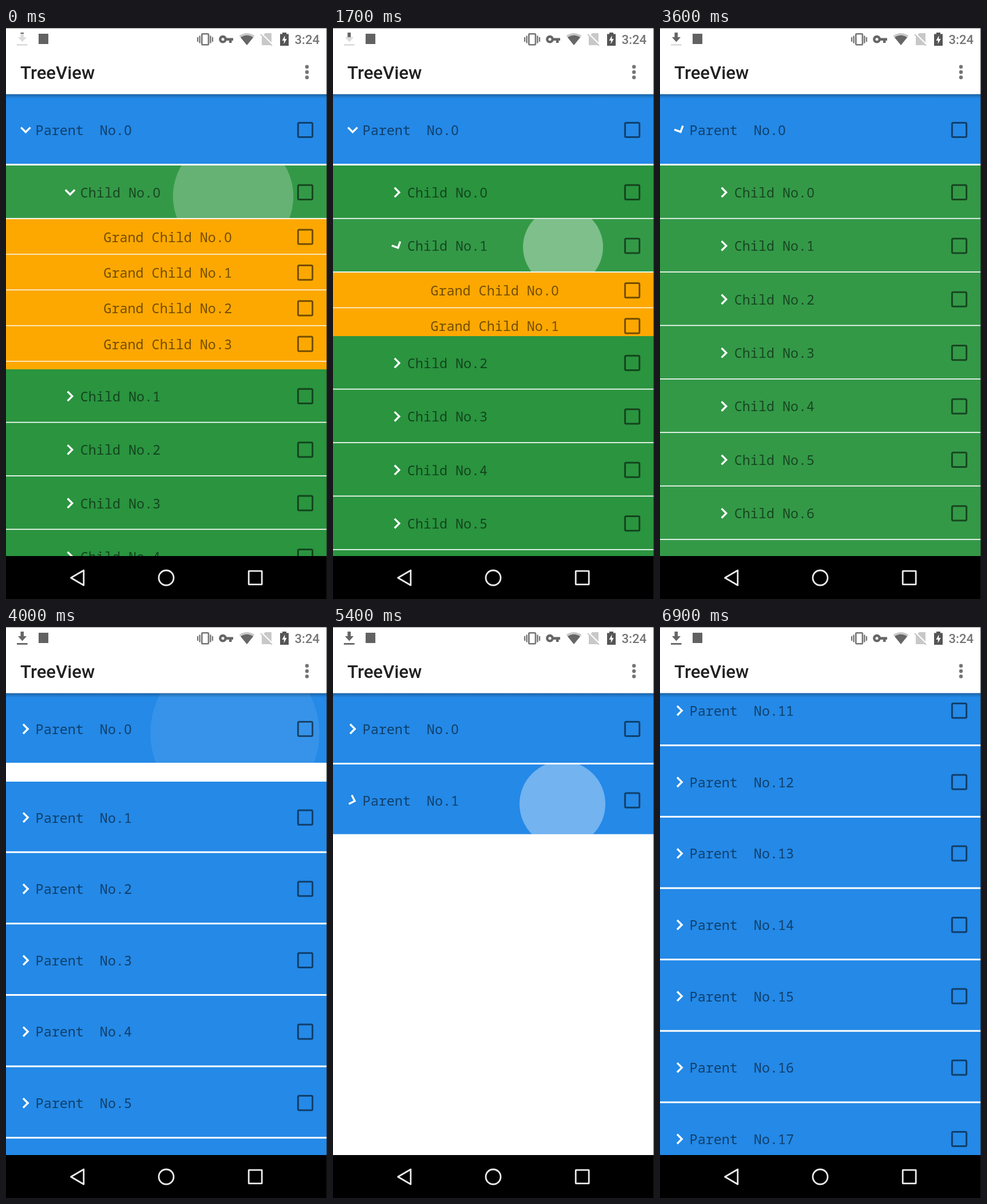
Write an HTML page with a canvas that moves like this. It is 561x997 px and loops after 7000 ms.

```html
<!DOCTYPE html>
<html lang="en">
<head>
<meta charset="utf-8">
<title>TreeView</title>
<style>
  html, body { margin: 0; width: 100%; height: 100%; overflow: hidden; background: #fff; }
  canvas { display: block; }
</style>
</head>
<body>
<canvas id="stage" width="561" height="997"></canvas>
<script>
const ctx = document.getElementById('stage').getContext('2d');
const W = 561, LOOP = 7000, LIST_TOP = 115.4, LIST_END = 922;
const INK = 'rgba(0,0,0,.54)', GRAY = '#757575';

const levels = [
  { color: '#2489e7', pitch: 124.65, line: 3, count: 20, label: 'Parent  No.', textX: 51.6, arrowX: 34.4, mid: 62.6 },
  { color: '#2a943f', pitch: 93.4, line: 1.7, count: 30, label: 'Child No.', textX: 129.8, arrowX: 112, mid: 46.9 },
  { color: '#fca800', pitch: 62.3, line: 1.4, count: 5, label: 'Grand Child No.', textX: 170.4, mid: 31.3 }
];

// x and y give the touch point inside the row
const taps = [
  { id: '0.0', at: -222, open: true, x: 397, y: 54 },
  { id: '0.0', at: 800, open: false, x: 400, y: 52 },
  { id: '0.1', at: 1578, open: true, x: 402, y: 49 },
  { id: '0.1', at: 2560, open: false, x: 401, y: 50 },
  { id: '0', at: 3533, open: false, x: 400, y: 70 },
  { id: '1', at: 4590, open: true, x: 400, y: 69 },
  { id: '1', at: 5266, open: false, x: 401, y: 69 }
];

const ease = u => (1 - Math.cos(Math.PI * Math.min(1, Math.max(0, u)))) / 2;

function nodeState(id, t) {
  const state = { height: id === '0' ? 1 : 0, turn: id === '0' ? 1 : 0, blank: false, tap: null };
  for (const tap of taps) {
    const age = t - tap.at;
    if (tap.id !== id || age < -60) continue;
    state.tap = tap;
    if (age < 0) continue;
    const duration = id.includes('.') ? 300 : 500;
    const grown = ease(age / duration), turned = ease(age / 190);
    state.height = tap.open ? grown : 1 - grown;
    state.turn = tap.open ? turned : 1 - turned;
    state.blank = !tap.open && duration === 500 && age > 100;
  }
  return state;
}

function fill(color, x, y, w, h) {
  ctx.fillStyle = color;
  ctx.fillRect(x, y, w, h);
}

function path(points, close) {
  ctx.beginPath();
  points.forEach(([x, y]) => ctx.lineTo(x, y));
  if (close) ctx.closePath();
}

function polygon(color, ...points) {
  path(points, true);
  ctx.fillStyle = color;
  ctx.fill();
}

function stroke(color, width, ...points) {
  path(points, false);
  ctx.strokeStyle = color;
  ctx.lineWidth = width;
  ctx.stroke();
}

function circle(x, y, r) {
  ctx.beginPath();
  ctx.arc(x, y, r, 0, 7);
}

function dot(color, x, y, r) {
  circle(x, y, r);
  ctx.fillStyle = color;
  ctx.fill();
}

function box(color, width, x, y, w, h, r) {
  ctx.beginPath();
  ctx.roundRect(x, y, w, h, r);
  ctx.strokeStyle = color;
  ctx.lineWidth = width;
  ctx.stroke();
}

function text(str, x, y, font, color) {
  ctx.font = font;
  ctx.fillStyle = color;
  ctx.fillText(str, x, y);
}

// The zero is set in the proportional face, which has no slash
function label(str, x, y) {
  const mono = '23.4px "Noto Sans Mono", monospace';
  text(str.replace('0', ' '), x, y, mono, INK);
  const zero = str.indexOf('0');
  if (zero >= 0) text('0', x + zero * 14.04 + .3, y, '23.4px "Noto Sans", sans-serif', INK);
}

function chevron(x, y, turn) {
  ctx.save();
  ctx.translate(x, y);
  ctx.rotate(turn * Math.PI / 2);
  stroke('#fff', 3.4, [-4.4, -8.2], [3.8, 0], [-4.4, 8.2]);
  ctx.restore();
}

function ripple(tap, y, height, age) {
  if (age < 80 || age > 660) return;
  const r = 170 * (1 - Math.exp(-age / 230));
  const alpha = Math.min(.37, .37 - (r - 72) * .0038);
  ctx.save();
  ctx.beginPath();
  ctx.rect(0, y, W, height);
  ctx.clip();
  dot(`rgba(255,255,255,${alpha})`, tap.x, y + tap.y, r);
  ctx.restore();
}

function drawRow(depth, index, y, state, lit, t) {
  const level = levels[depth], height = level.pitch - level.line, mid = y + level.mid;
  fill(level.color, 0, y, W, height);
  const age = state.tap ? t - state.tap.at : Infinity;
  if (depth === 1 && (lit || age < 480)) fill('rgba(255,255,255,.042)', 0, y, W, height);
  if (state.tap) ripple(state.tap, y, height, age);
  if (depth < 2) chevron(level.arrowX, mid, state.turn);
  label(level.label + index, level.textX, mid + 8.9);
  box(INK, 3, 510.4, mid - 12.6, 25.2, 25.2, 2);
}

function drawList(depth, y, prefix, lit, t) {
  const level = levels[depth], inner = levels[depth + 1];
  for (let i = 0; i < level.count && y < LIST_END; i++) {
    const id = prefix + i, state = nodeState(id, t);
    drawRow(depth, i, y, state, lit, t);
    y += level.pitch;
    if (!inner || !state.height) continue;
    const end = Math.round(y + state.height * inner.pitch * inner.count);
    if (!state.blank) {
      ctx.save();
      ctx.beginPath();
      ctx.rect(0, y, W, end - y);
      ctx.clip();
      drawList(depth + 1, y, id + '.', depth === 0 && state.tap && t - state.tap.at < 480, t);
      ctx.restore();
    }
    y = end;
  }
}

function downloadIcon(t) {
  const step = Math.floor(((t - 1150 + LOOP + 500) % 1500) / 250);
  const shape = color => {
    fill(color, 25.5, 8, 5.5, 9);
    polygon(color, [21, 16], [36, 16], [28.5, 24.5]);
    fill(color, 19, 28, 18.5, 2.8);
  };
  shape('#dcdcdc');
  ctx.save();
  ctx.beginPath();
  ctx.rect(15, 8, 26, [0, 2, 8, 17, 17, 24][step]);
  ctx.clip();
  shape('#666');
  ctx.restore();
}

function statusBar(t) {
  downloadIcon(t);
  fill('#626262', 57, 10, 17, 18);

  box(GRAY, 2.6, 342.3, 10.3, 11.6, 19, 1.5);
  for (const side of [-1, 1]) {
    stroke(GRAY, 2.4, [348 + side * 9.4, 13.5], [348 + side * 9.4, 26.5]);
    stroke(GRAY, 2.2, [348 + side * 13, 16], [348 + side * 13, 24]);
  }

  circle(379, 19.7, 4.7);
  ctx.strokeStyle = '#666';
  ctx.lineWidth = 4.4;
  ctx.stroke();
  fill('#666', 384, 17.5, 13, 4.5);
  fill('#666', 390, 20, 4.5, 6);

  ctx.beginPath();
  ctx.moveTo(421, 30);
  ctx.lineTo(407.5, 13.5);
  ctx.quadraticCurveTo(421, 4.5, 434.5, 13.5);
  ctx.closePath();
  ctx.fillStyle = '#c8c8c8';
  ctx.fill();
  ctx.beginPath();
  ctx.moveTo(421, 30);
  ctx.lineTo(410, 16.5);
  ctx.quadraticCurveTo(421, 9, 432, 16.5);
  ctx.closePath();
  ctx.fillStyle = '#666';
  ctx.fill();

  polygon('#c8c8c8', [453, 9], [464, 9], [464, 30], [447, 30], [447, 15]);
  stroke('#fff', 2.4, [447, 10], [467, 30]);
  stroke('#c8c8c8', 2.2, [445, 11], [465, 31]);

  fill('#555', 479, 10.5, 15, 20.5);
  fill('#555', 483, 8, 7, 3);
  polygon('#fff', [487.5, 13], [482.5, 22], [486, 22], [485.5, 28], [490.7, 19], [487.2, 19]);
  text('3:24', 504.6, 27.5, '500 22px Roboto, sans-serif', GRAY);
}

function appBar(t) {
  const shadow = ctx.createLinearGradient(0, 115, 0, 123);
  shadow.addColorStop(0, 'rgba(0,0,0,.3)');
  shadow.addColorStop(1, 'rgba(0,0,0,0)');
  fill(shadow, 0, 115, W, 8);
  fill('#fff', 0, 0, W, 115.4);
  statusBar(t);
  text('TreeView', 25, 88.5, '500 31.2px Roboto, sans-serif', '#212121');
  for (const y of [67.7, 77, 86.3]) dot(GRAY, 526, y, 3.2);
}

function navBar() {
  const ink = '#ececec';
  fill('#000', 0, LIST_END, W, 75);
  path([[113.5, 960], [135.8, 947], [135.8, 973]], true);
  ctx.strokeStyle = ink;
  ctx.lineWidth = 2.8;
  ctx.lineJoin = 'round';
  ctx.stroke();
  ctx.lineJoin = 'miter';
  circle(280, 960, 13);
  ctx.stroke();
  box(ink, 2.8, 424.2, 948.2, 23, 23.4, .5);
}

function draw(t) {
  fill('#fff', 0, 0, W, 997);
  const scroll = 2134 * (1 - Math.exp(-Math.max(0, t - 5850) / 980));
  drawList(0, LIST_TOP - scroll, '', false, t);
  appBar(t);
  navBar();
  fill('#777', 0, 0, W, .8);
  fill('#222', 560.2, 0, .8, 997);
}

function tick() {
  const now = performance.now() % LOOP;
  draw(Math.floor(now / 100) * 100);
  requestAnimationFrame(tick);
}
tick();
</script>
</body>
</html>
```
